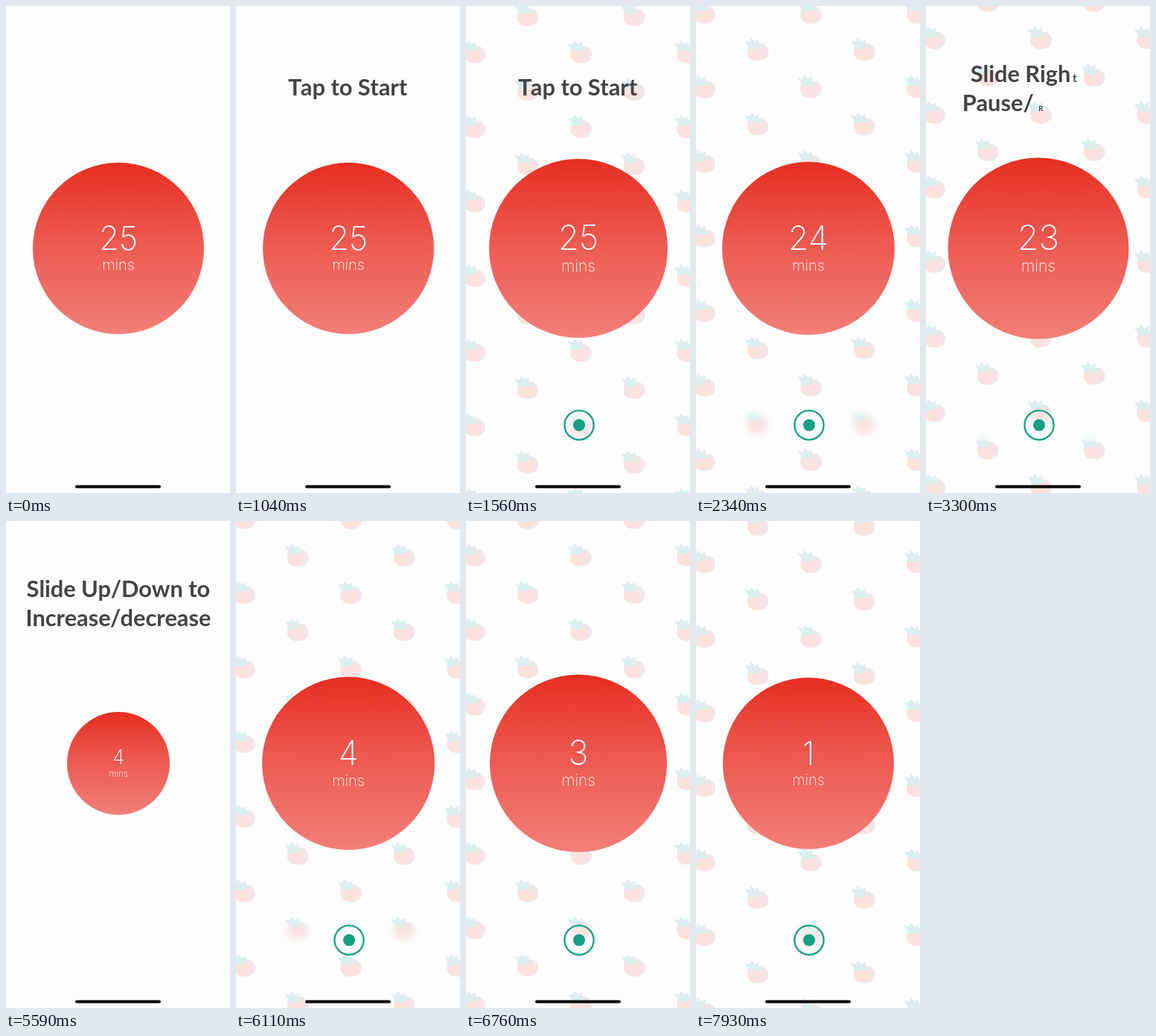
An HTML page that plays this animation: 301 by 653 pixels, repeating every 8000 ms.

```html
<!DOCTYPE html>
<html lang="en">
<head>
<meta charset="utf-8">
<title>Tomato timer</title>
<style>
  html, body { margin: 0; width: 100%; height: 100%; overflow: hidden; background: #fdfdfd; }
  svg { position: absolute; left: 0; top: 0; width: 301px; height: 653px; overflow: hidden; }
  #frost {
    position: absolute; left: 41px; top: 540px; width: 221px; height: 44px;
    border-radius: 22px; backdrop-filter: blur(4px);
  }
  text { text-anchor: middle; }
  .title { font: 700 30.8px Lato, "Open Sans", sans-serif; fill: #444; }
  .dial { font-family: Inter, Roboto, sans-serif; font-weight: 200; fill: #fff; }
  .ring { fill: none; stroke: #16a085; stroke-width: 2.3; }
  .on { fill: #16a085; }
  .off { fill: #cfcfcf; }
</style>
</head>
<body>
<svg id="back" viewBox="0 0 301 653">
  <defs>
    <g id="tomato">
      <ellipse cx="3" cy="3" rx="12.5" ry="11.8" fill="#efe6ee"/>
      <ellipse cx="-1" cy="3" rx="12.3" ry="11.8" fill="#fbe2df"/>
      <path d="M-17-12L-10-11L-8-16L-3-11L3-14L2-8L9-4L2-3L-2 0L-6-3L-13 1L-12-5Z" fill="#dceeee"/>
    </g>
    <pattern id="fruit" x="46" y="-25" width="143" height="100" patternUnits="userSpaceOnUse">
      <use href="#tomato" x="36" y="25"/>
      <use href="#tomato" x="107.5" y="75"/>
    </pattern>
  </defs>
  <g id="rain"><rect y="-100" width="301" height="860" fill="url(#fruit)"/></g>
</svg>
<div id="frost"></div>
<svg id="front" viewBox="0 0 301 653">
  <defs>
    <linearGradient id="red" x1="0" y1="0" x2="0" y2="1">
      <stop offset="0" stop-color="#e62e20"/>
      <stop offset=".5" stop-color="#ed5c54"/>
      <stop offset="1" stop-color="#f27f78"/>
    </linearGradient>
    <g id="bars">
      <rect x="-7" y="-8" width="5" height="16" rx="1"/>
      <rect x="2" y="-8" width="5" height="16" rx="1"/>
    </g>
    <rect id="square" x="-8.5" y="-8.5" width="17" height="17" rx="3"/>
  </defs>
  <g id="titles"></g>
  <g id="dial">
    <circle r="115" fill="url(#red)"/>
    <text id="count" class="dial" y="1.8" font-size="44">25</text>
    <text class="dial" y="29.3" font-size="20">mins</text>
  </g>
  <g id="control">
    <use id="stopHint" class="off" href="#square" x="62" y="562"/>
    <use id="pauseHint" class="off" href="#bars" x="240" y="562"/>
    <g id="knob">
      <circle class="ring" r="19.6"/>
      <circle id="dot" class="on" r="8"/>
      <use id="stopIcon" class="on" href="#square"/>
      <use id="pauseIcon" class="on" href="#bars"/>
    </g>
  </g>
  <rect x="93" y="642.4" width="115" height="4.2" rx="2.1" fill="#000"/>
</svg>
<script>
const LOOP = 8000, STEP = 130;
const $ = id => document.getElementById(id);
const clamp = v => Math.max(0, Math.min(1, v));

// Stretches that advance in steps; between them the picture rests.
const runs = [[0, 2470], [2870, 2870], [3170, 4730], [5030, 5290], [5590, 7930]];

// Points are [time, value].
const fade = [[1040, 0], [1300, 1], [4600, 1], [4730, 0], [5850, 0], [6050, 1]];
const drift = [[1040, 48], [1560, 12], [3300, -107], [3560, -126], [3900, -126],
  [4340, -153], [4700, -180], [5880, -136], [6760, -204], [7930, -295]];
const pulse = [[1200, 0], [1560, .25], [3300, 1.702], [3560, 1.99], [3900, 1.99],
  [4340, 2.352], [4640, 2.65], [4800, 3], [6012, 3], [7930, 5]];
const size = [[5060, 115], [5560, 69], [5880, 69], [6012, 115]];
const slide = [[3380, 152], [3550, 240], [3680, 240], [3820, 152],
  [4080, 152], [4320, 62], [4560, 62], [4680, 152]];
const minutes = [[0, 25], [2080, 24], [2990, 23], [3900, 22], [4640, 25]];
const lastMinutes = [[5880, 4], [6240, 3], [7020, 2], [7800, 1]];

const titles = [
  { lines: ["Tap to Start"], from: 200, to: 1900 },
  { lines: ["Slide Right to", "Pause/Resume"], from: 2980, to: 3640 },
  { lines: ["Slide Left to Stop"], from: 3740, to: 4480 },
  { lines: ["Slide Up/Down to", "Increase/decrease"], from: 4620, to: 5800 }
];
const LETTER = 30, GROW = 40, LINE = 128, VANISH = 120;

function track(points, t) {
  if (t <= points[0][0]) return points[0][1];
  for (let i = 1; i < points.length; i++) {
    const [a, u] = points[i - 1], [b, v] = points[i];
    if (t < b) return u + (v - u) * (t - a) / (b - a);
  }
  return points[points.length - 1][1];
}

const latest = (points, t) => points.filter(p => p[0] <= t).pop()[1];

function stepped(t) {
  const [from, to] = runs.filter(r => r[0] <= t).pop();
  return Math.min(to, from + Math.floor((t - from) / STEP) * STEP);
}

function addText(parent, str, x, y) {
  const el = document.createElementNS("http://www.w3.org/2000/svg", "text");
  el.setAttribute("class", "title");
  el.setAttribute("x", x);
  el.setAttribute("y", y);
  el.textContent = str;
  parent.appendChild(el);
  return el;
}

// Lay out each line once, then split it into letters that can grow in place.
function buildTitle(title) {
  title.letters = [];
  title.lines.forEach((str, row) => {
    const y = title.lines.length > 1 ? 101.5 + row * 39.5 : 119.5;
    const whole = addText($("titles"), str, 151, y);
    [...str].forEach((ch, k) => {
      if (ch === " ") return;
      const x = (whole.getStartPositionOfChar(k).x + whole.getEndPositionOfChar(k).x) / 2;
      const el = addText($("titles"), ch, 0, 0);
      title.letters.push({ el, x, y, at: title.from + row * LINE + k * LETTER });
    });
    whole.remove();
  });
}

function drawTitle(title, t) {
  const alpha = clamp(1 - (t - title.to) / VANISH);
  for (const { el, x, y, at } of title.letters) {
    const s = clamp((t - at) / GROW);
    el.style.display = s && alpha ? "" : "none";
    el.setAttribute("transform", `translate(${x} ${y}) scale(${s})`);
    el.setAttribute("opacity", alpha);
  }
}

function drawDial(t) {
  const base = track(size, t);
  const r = base + 5 * (1 - Math.cos(2 * Math.PI * track(pulse, t)));
  let n = latest(minutes, t);
  if (t >= 5880) n = latest(lastMinutes, t);
  else if (t >= 5060) n = Math.round(25 - (115 - base) * 21 / 46);
  $("dial").setAttribute("transform", `translate(151 325) scale(${r / 115})`);
  $("count").textContent = n;
}

function drawControl(t) {
  const x = track(slide, t);
  const left = clamp((152 - x) / 60), right = clamp((x - 152) / 60);
  const drag = Math.max(left, right);
  $("knob").setAttribute("transform", `translate(${x} 562)`);
  $("dot").setAttribute("opacity", 1 - drag);
  $("stopIcon").setAttribute("opacity", left);
  $("pauseIcon").setAttribute("opacity", right);
  $("stopHint").setAttribute("opacity", right);
  $("pauseHint").setAttribute("opacity", left);
}

function draw(t) {
  const alpha = track(fade, t);
  $("rain").setAttribute("opacity", alpha);
  $("rain").setAttribute("transform", `translate(0 ${(track(drift, t) + 400) % 100})`);
  $("control").setAttribute("opacity", alpha);
  drawDial(t);
  drawControl(t);
  titles.forEach(title => drawTitle(title, t));
}

titles.forEach(buildTitle);
const start = performance.now();
function frame() {
  draw(stepped((performance.now() - start) % LOOP));
  requestAnimationFrame(frame);
}
frame();
</script>
</body>
</html>
```
